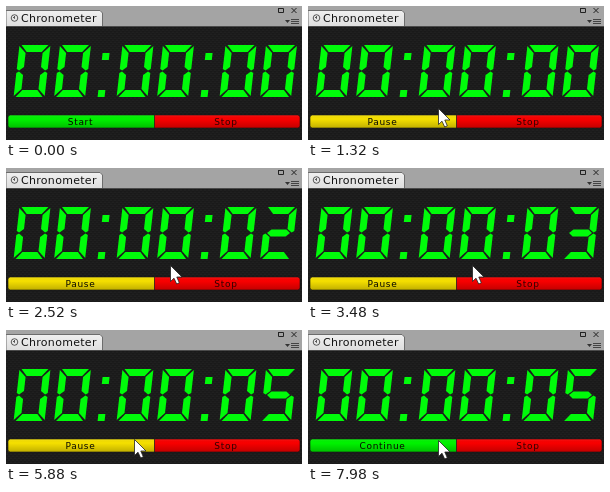
Recreate the animation shown at these times as an HTML page. Size 296x134 px, loop 8000 ms.

```html
<!DOCTYPE html>
<html lang="en">
<head>
<meta charset="utf-8">
<title>Chronometer</title>
<style>
html, body { margin: 0; width: 100%; height: 100%; overflow: hidden; background: #1b1b1b; }
svg { display: block; width: 296px; height: 134px; }
text { font-family: "DejaVu Sans", sans-serif; }
.title { font-size: 11px; letter-spacing: .3px; }
.label { font-size: 9px; letter-spacing: .7px; text-anchor: middle; }
</style>
</head>
<body>
<svg viewBox="0 0 296 134">
  <defs>
    <pattern id="weave" width="4" height="4" patternUnits="userSpaceOnUse">
      <rect width="4" height="4" fill="#1c1c1c"/>
      <path d="M0 0h2v1h-2zM2 2h2v1h-2z" fill="#202020"/>
      <path d="M0 1h2v1h-2zM2 3h2v1h-2z" fill="#191919"/>
    </pattern>
    <linearGradient id="shade" x2="0" y2="1">
      <stop offset="0" stop-color="#fff" stop-opacity=".1"/>
      <stop offset=".3" stop-color="#000" stop-opacity="0"/>
      <stop offset="1" stop-color="#000" stop-opacity=".22"/>
    </linearGradient>
    <linearGradient id="tab" x2="0" y2="1">
      <stop offset="0" stop-color="#f0f0f0"/>
      <stop offset="1" stop-color="#dedede"/>
    </linearGradient>
  </defs>

  <rect width="296" height="134" fill="url(#weave)"/>
  <rect width="296" height="20" fill="#a4a4a4"/>
  <path d="M0 20.5H296" stroke="#4a4a4a"/>
  <path d="M0 20V4.500H94L96.500 7V20" fill="url(#tab)" stroke="#6c6c6c"/>
  <g fill="none" stroke="#333" stroke-width=".8">
    <circle cx="8.500" cy="12" r="3.300"/>
    <path d="M8.500 12.500V10M8.500 12.500L7 11"/>
  </g>
  <text class="title" x="15" y="16" fill="#111">Chronometer</text>
  <g fill="none" stroke="#222">
    <path d="M273 2.500H277.500V6.500H272.500V2M285.500 2L290.500 7M290.500 2L285.500 7"/>
    <path d="M285 13.500H293M285 15.500H293M285 17.500H293" stroke="#444"/>
    <path d="M279 14H284L281.500 17Z" fill="#333" stroke="none"/>
  </g>

  <g id="digits" fill="#00fb0a"></g>

  <path id="left" d="M148.500 109H4.500Q2 109 2 111.500V119.500Q2 122 4.500 122H148.500Z"/>
  <path d="M148.500 109H291.500Q294 109 294 111.500V119.500Q294 122 291.500 122H148.500Z" fill="#fa0000"/>
  <rect x="2" y="109" width="292" height="13" rx="2.500" fill="url(#shade)" stroke="#111" stroke-width=".6"/>
  <path d="M148.500 109V122" stroke="#222" stroke-opacity=".7"/>
  <text id="caption" class="label" x="74.500" y="119" fill="#080800"></text>
  <text class="label" x="220" y="119" fill="#300000">Stop</text>

  <path id="cursor" d="M.5 .5V16.500L4 13.200L6.700 19L9.300 17.800L6.800 12H12Z"
        fill="#fff" stroke="#222" stroke-width=".8"/>
</svg>
<script>
const LOOP = 8000, STEP = 60, SECOND = 960;
const TOP = 39, W = 31, H = 52, T = 7;
const SLANT = `skewX(-6.5)`;
const advance = c => c === ":" ? 22 : c === "1" ? 25 : 40.5;
const $ = id => document.getElementById(id);

// Two base outlines, mirrored to make the other segments.
const bar = [[2, 0], [W - 2, 0], [W - 8, T], [8, T]];
const post = [[0, 1], [T, T + 1], [T, H / 2 - 4], [2.5, H / 2 - .5], [0, H / 2 - 2]];
const flipX = pts => pts.map(([x, y]) => [W - x, y]);
const flipY = pts => pts.map(([x, y]) => [x, H - y]);
const middle = [[4, H / 2], [8, H / 2 - T / 2], [W - 8, H / 2 - T / 2]];
const segments = {
  a: bar, d: flipY(bar),
  f: post, e: flipY(post), b: flipX(post), c: flipX(flipY(post)),
  g: [...middle, ...flipX(flipY(middle))]
};
const shapes = ["abcdef", "bc", "abdeg", "abcdg", "bcfg", "acdfg"];

const captions = [[0, "Start", "#00f400"], [1020, "Pause", "#f6e000"], [6000, "Continue", "#00f400"]];

// Pointer moves: begin, duration, x and y reached
const entry = { time: 120, x: 232, y: 70 };
const moves = [
  [120, 660, 112, 112], [1080, 720, 182, 72], [1800, 240, 180, 80], [2160, 360, 164, 97],
  [5220, 840, 123, 111], [6060, 360, 150, 90], [7560, 420, 130, 110]
];

function glyph(c, x) {
  if (c === ":") {
    return `<path transform="translate(${x + 12} ${TOP}) ${SLANT}" d="M0 8h7v7h-7zM0 ${H - T}h7v7h-7z"/>`;
  }
  const left = x + 9 - (c === "1" ? 19 : 0);
  const body = [...shapes[c]].map(s => `<polygon points="${segments[s].join(" ")}"/>`).join("");
  return `<g transform="translate(${left} ${TOP}) ${SLANT}">${body}</g>`;
}

function drawTime(sec) {
  const chars = [..."00:00:0" + sec];
  let x = 148 - chars.reduce((sum, c) => sum + advance(c), 0) / 2;
  $("digits").innerHTML = chars.map(c => {
    const out = glyph(c, x);
    x += advance(c);
    return out;
  }).join("");
}

function pointer(t) {
  let { x, y } = entry;
  for (const [begin, span, toX, toY] of moves) {
    const k = Math.max(0, Math.min(1, (t - begin) / span));
    const ease = k * k * (3 - 2 * k);
    x += (toX - x) * ease;
    y += (toY - y) * ease;
  }
  return [Math.round(x), Math.round(y)];
}

let shown = -1;
function render(ms) {
  const t = Math.floor((ms % LOOP) / STEP) * STEP;
  const sec = Math.max(0, Math.min(5, Math.floor((t - 600) / SECOND)));
  if (sec !== shown) drawTime(shown = sec);

  const [, label, color] = captions.filter(c => c[0] <= t).pop();
  $("caption").textContent = label;
  $("left").setAttribute("fill", color);

  const [x, y] = pointer(t);
  $("cursor").setAttribute("transform", `translate(${x} ${y})`);
  $("cursor").setAttribute("visibility", t < entry.time ? "hidden" : "visible");
}

const start = performance.now();
function tick() {
  render(performance.now() - start);
  requestAnimationFrame(tick);
}
render(0);
tick();
</script>
</body>
</html>
```
